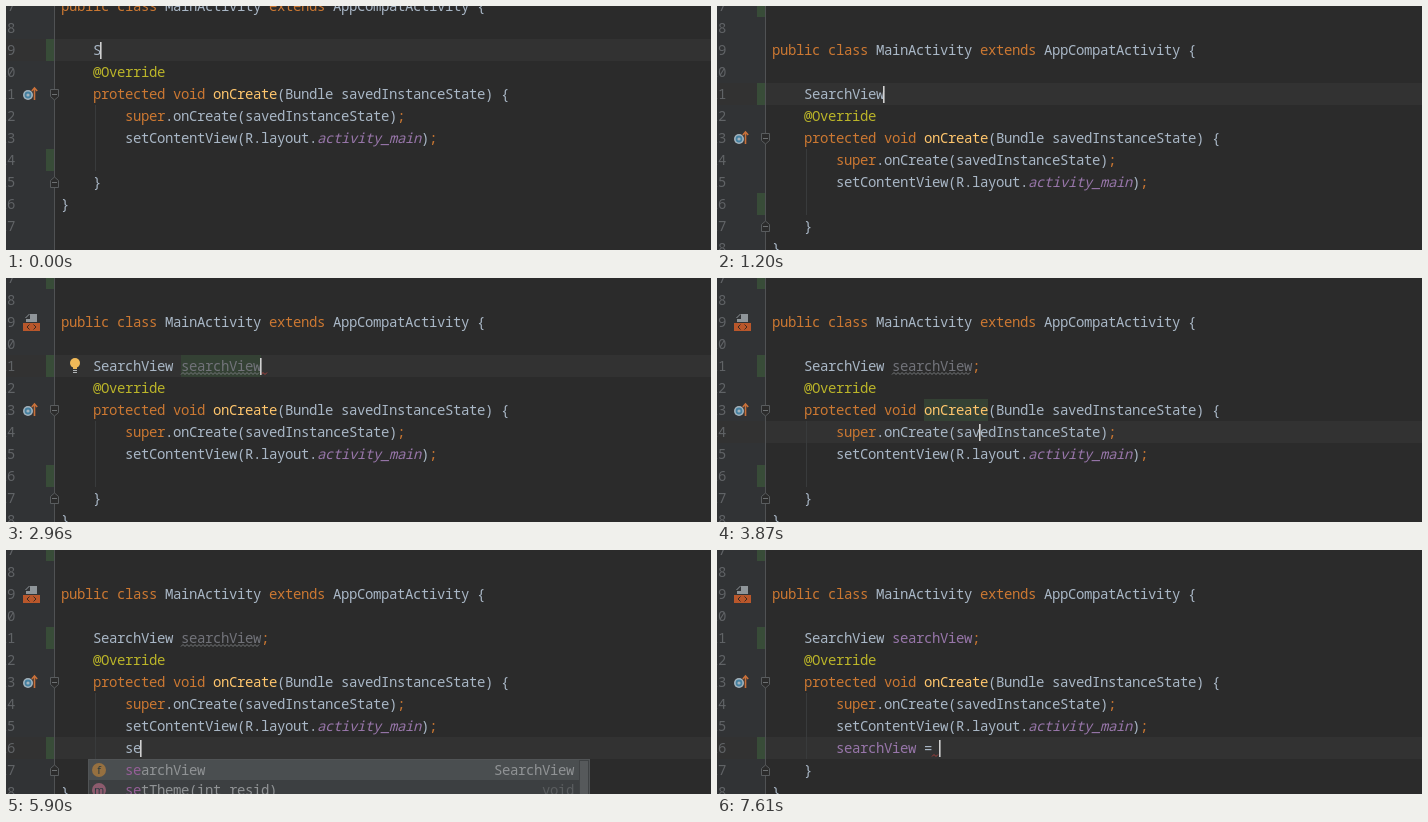
An HTML page with a canvas for the animation above (8 s loop, 705 by 244 pixels).

```html
<!DOCTYPE html>
<html lang="en">
<head>
<meta charset="utf-8">
<title>Code completion</title>
<style>
  html, body { margin: 0; width: 100%; height: 100%; overflow: hidden; background: #2b2b2b; }
  canvas { display: block; }
</style>
</head>
<body>
<canvas id="stage" width="705" height="244"></canvas>
<script>
const ctx = document.getElementById('stage').getContext('2d');
const W = 705, H = 244, LOOP = 8000, CHAR = 8, LEFT = 55, ROW = 22;
const FONT = '14px "Noto Sans Mono", "DejaVu Sans Mono", monospace';
const TEXT = '#a9b7c6', KEY = '#cc7832', FIELD = '#9876aa', METHOD = '#ffc66d',
      NOTE = '#bbb529', UNUSED = '#72737a', MARK = '#344134', ERROR = '#a5413d';

// the editor rounds its 8.4px character cells down to whole pixels
ctx.letterSpacing = '-0.4px';

const DECL = [[0, 'S'], [200, 'Se'], [270, 'Sea'], [400, 'Sear'], [1090, 'SearchView'],
  [1730, 'SearchView '], [1910, 'SearchView s'], [2370, 'SearchView searchView'], [3170, 'SearchView searchView;']];
const STATEMENT = [[0, ''], [5640, 's'], [5900, 'se'], [6080, 'sea'], [6370, 'searchView'],
  [6850, 'searchView '], [7170, 'searchView ='], [7430, 'searchView = ']];
// time, line, column; lines are counted from the class header
const CARET = [[3500, 3, 13], [3680, 4, 26], [3810, 5, 26], [4030, 6, 26], [4230, 7, 0], [4660, 7, 4], [4820, 7, 8]];
const DECL_ERROR = [[0, -1], [2490, 25], [3170, 26], [3500, -1]];
const STATEMENT_ERROR = [[0, -1], [6440, 18], [6850, 19], [7270, 20], [7430, 21], [7610, 20]];

const CLASSES = [
  ['SearchView', 'com.tarikolvenda.searchview', 'class'], ['SearchView', 'android.widget', 'class'],
  ['SearchView', 'android.support.v7.widget', 'class'], ['SealedObject', 'javax.crypto'],
  ['SearchableInfo', 'android.app'], ['SearchEvent', 'android.view'],
  ['SearchIterator', 'android.icu.text'], ['SearchManager', 'android.app'],
  ['SearchRecentSuggestions', 'android.provider'], ['SearchRecentSuggestionsProvider', 'android.content'],
  ['SearchableField', 'android.app']];

const between = (t, a, b) => t >= a && t < b;
const latest = (t, steps) => steps.filter(s => s[0] <= t).pop();
const colX = col => LEFT + col * CHAR;

function rect(x, y, w, h, color) { ctx.fillStyle = color; ctx.fillRect(x, y, w, h); }

function disc(x, y, r, color) {
  ctx.fillStyle = color;
  ctx.beginPath(); ctx.arc(x, y, r, 0, 7); ctx.fill();
}

function line(points, color, width = 1) {
  ctx.strokeStyle = color; ctx.lineWidth = width;
  ctx.beginPath();
  points.forEach(p => ctx.lineTo(...p));
  ctx.stroke();
}

function label(str, x, y, color, font = FONT, align = 'left') {
  ctx.font = font; ctx.fillStyle = color; ctx.textAlign = align;
  ctx.fillText(str, x, y);
}

// tokens alternate text and colour
function code(col, y, ...tokens) {
  for (let i = 0; i < tokens.length; i += 2) {
    label(tokens[i], colX(col), y + 5, tokens[i + 1], (tokens[i] === 'activity_main' ? 'italic ' : '') + FONT);
    col += tokens[i].length;
  }
}

function highlight(col, y, length) { rect(colX(col), y - 11, length * CHAR, ROW, MARK); }

function squiggle(col, y, length, color) {
  const points = [];
  for (let x = 0; x <= length * CHAR - 1; x += 2) points.push([colX(col) + x, y + (x % 4 ? 6.5 : 8.5)]);
  line(points, color);
}

function foldMark(y, dir) {
  const cy = y + .5;
  const points = [[44.5, cy - 5 * dir], [52.5, cy - 5 * dir], [52.5, cy + 2 * dir], [48.5, cy + 5.5 * dir],
    [44.5, cy + 2 * dir], [44.5, cy - 5 * dir]];
  ctx.fillStyle = '#2b2b2b';
  ctx.beginPath(); points.forEach(p => ctx.lineTo(...p)); ctx.fill();
  line(points, '#595c5e');
  line([[46, cy], [51, cy]], '#6c6f71');
}

function overrideIcon(y) {
  disc(22, y + 1, 5, '#a3b3bd');
  disc(22, y + 1, 3.4, '#4580a0');
  disc(22, y + 1, 1.6, '#a3b3bd');
  line([[28.5, y + 6], [28.5, y - 5]], '#c9713a', 1.6);
  line([[25.8, y - 3], [28.5, y - 6], [31.2, y - 3]], '#c9713a', 1.6);
}

function layoutIcon(y) {
  rect(24, y - 8, 7, 8, '#8f9599');
  rect(20, y - 3, 4, 3, '#8f9599');
  line([[19.5, y - 4], [23.5, y - 8]], '#8f9599');
  rect(17, y + 1, 17, 8, '#b9572b');
  line([[23.5, y + 2.5], [21, y + 5], [23.5, y + 7.5]], '#3b2a22');
  line([[27.5, y + 2.5], [30, y + 5], [27.5, y + 7.5]], '#3b2a22');
}

function bulb(x, y) {
  disc(x, y - 3, 5, '#f0b958');
  rect(x - 2, y + 1, 4, 2, '#f0b958');
  rect(x - 2, y + 4, 4, 1, '#b0b3b5');
  rect(x - 2, y + 6, 4, 1, '#b0b3b5');
}

function badge(x, y, letter, color) {
  disc(x, y, 7, color);
  label(letter, x, y + 4, '#25383f', '11px "Open Sans", sans-serif', 'center');
}

function lock(x, y, color) {
  rect(x, y, 5, 4, color);
  line([[x - 2.5, y], [x - 2.5, y - 2.5], [x + .5, y - 2.5], [x + .5, y]], color);
}

function itemIcon(kind, x, y, first) {
  if (kind === 'class') {
    badge(x, y, 'C', '#3e6c7e');
    lock(x + 15, y, first ? '#4a7a42' : '#2a2c2d');
  } else if (kind) {
    badge(x, y, kind, kind === 'm' ? '#8d5b6d' : '#967040');
  } else {
    rect(x - 1, y - 7, 6, 7, '#7b8084');
    rect(x - 5, y - 3, 4, 3, '#7b8084');
    line([[x - 5.5, y - 3.5], [x - 1.5, y - 7.5]], '#7b8084');
    rect(x - 8, y + 1, 15, 7, '#3b6475');
    label('01', x - .5, y + 7.5, '#20343d', 'bold 8px "Liberation Mono", monospace', 'center');
  }
}

function popupFrame(x, y, w, h) {
  rect(x, y, w, h, '#515456');
  rect(x + 1, y + 1, w - 2, h - 2, '#3c3f41');
  rect(x + 1, y + 1, w - 2, 20, '#4a4e50');
}

function itemName(name, prefix, x, y) {
  const n = name.startsWith(prefix) ? prefix.length : 0;
  label(name.slice(0, n), x, y + 5, '#965f98');
  label(name.slice(n), x + n * CHAR, y + 5, '#909395');
}

function spinner(x, y, t) {
  const head = Math.floor(t / 40);
  for (let i = 0; i < 8; i++) {
    const a = i * Math.PI / 4, shade = 100 + ((i - head) % 8 + 8) % 8 * 14;
    line([[x + 2.5 * Math.cos(a), y + 2.5 * Math.sin(a)], [x + 6 * Math.cos(a), y + 6 * Math.sin(a)]],
      `rgb(${shade},${shade},${shade})`, 1.4);
  }
}

// items: name, detail, icon kind; details go in brackets unless they are types
function popup(x, y, items, prefix, types) {
  popupFrame(x, y, 502, 300);
  rect(x + 491, y + 1, 10, 298, '#3f4244');
  rect(x + 492, y + 2, 8, 297, '#56595b');
  items.forEach(([name, detail, kind], i) => {
    const cy = y + 11 + i * 20, color = i ? '#5a5d5f' : '#909395';
    itemIcon(kind, x + 11, cy, i === 0);
    itemName(name, prefix, x + 37, cy);
    if (types) label(detail, x + 486, cy + 5, color, FONT, 'right');
    else label(`(${detail})`, x + 37 + (name.length + 1) * CHAR, cy + 5, color);
  });
}

function draw(t) {
  const imported = t >= 1180, top = imported ? 44 : 0;
  const y = n => top + n * ROW;
  const decl = latest(t, DECL)[1], statement = latest(t, STATEMENT)[1];
  let [, caretLine, caretCol] = latest(t, CARET) || [0, 2, 4 + decl.length];
  if (caretLine === 7) caretCol += statement.length;
  const caretY = y(caretLine);

  rect(0, 0, W, H, '#2b2b2b');
  rect(0, 0, 48, H, '#313335');
  rect(0, caretY - 11, W, ROW, '#323232');
  [2, 7].forEach(n => rect(40, y(n) - 11, 8, ROW, '#384c38'));
  if (imported) rect(40, 0, 8, 11, '#384c38');
  rect(48, 0, 1, H, '#505254');
  const lastLine = imported ? 19 : 17;
  for (let n = 7; n <= lastLine; n++) label(n, 9, 44 + (n - 9) * ROW + 5, '#606366', FONT, 'right');
  rect(89, y(5) - 11, 1, 3 * ROW, '#393b3c');
  foldMark(y(4), 1);
  foldMark(y(8), -1);
  overrideIcon(y(4));
  if (t >= 1660) layoutIcon(y(0));

  if (between(t, 1660, 2080)) highlight(4, y(2), 10);
  if (between(t, 2430, 3680) || between(t, 6370, 7270)) highlight(15, y(2), 10);
  if (between(t, 3740, 4030)) highlight(19, y(4), 8);
  if (between(t, 4130, 4520)) highlight(25, y(6), 6);
  if (between(t, 6370, 7270)) highlight(8, y(7), 10);

  const nameColor = t < 2490 ? TEXT : t < 6440 ? UNUSED : FIELD;
  code(0, y(0), 'public class ', KEY, 'MainActivity ', TEXT, 'extends ', KEY, 'AppCompatActivity {', TEXT);
  code(4, y(2), decl.slice(0, 11), TEXT, decl.slice(11, 21), nameColor, decl.slice(21), KEY);
  code(4, y(3), '@Override', NOTE);
  code(4, y(4), 'protected void ', KEY, 'onCreate', METHOD, '(Bundle savedInstanceState) {', TEXT);
  code(8, y(5), 'super', KEY, '.onCreate(savedInstanceState)', TEXT, ';', KEY);
  code(8, y(6), 'setContentView(R.layout.', TEXT, 'activity_main', FIELD, ')', TEXT, ';', KEY);
  code(8, y(7), statement.slice(0, 10), t < 6440 ? TEXT : FIELD, statement.slice(10), TEXT);
  code(4, y(8), '}', TEXT);
  code(0, y(9), '}', TEXT);

  if (between(t, 2490, 6440)) squiggle(15, y(2), 10, '#75787a');
  const declError = latest(t, DECL_ERROR)[1], statementError = latest(t, STATEMENT_ERROR)[1];
  if (declError > 0) squiggle(declError, y(2), 1, ERROR);
  if (statementError > 0) squiggle(statementError, y(7), 1, ERROR);
  if (between(t, 2960, 3190)) bulb(69, y(2));
  rect(colX(caretCol) - 1, caretY - 8, 1.6, 17, '#d0d0d0');

  if (between(t, 320, 1090)) {
    const prefix = t < 440 ? 'Sea' : 'Sear';
    popup(50, 55, CLASSES.filter(c => c[0].startsWith(prefix)), prefix);
    if (t < 600) spinner(530, 66, t);
  }
  if (between(t, 1980, 2370)) {
    popupFrame(165, 99, 151, 22);
    itemName('searchView', 's', 175, 110);
  }
  if (between(t, 5900, 6370)) {
    const second = t < 6080 ? ['setTheme(int resid)', 'void', 'm'] : ['onSearchRequested()', 'boolean', 'm'];
    popup(82, 209, [['searchView', 'SearchView', 'f'], second], statement, true);
  }
}

function tick() {
  draw(performance.now() % LOOP);
  requestAnimationFrame(tick);
}
tick();
</script>
</body>
</html>
```
